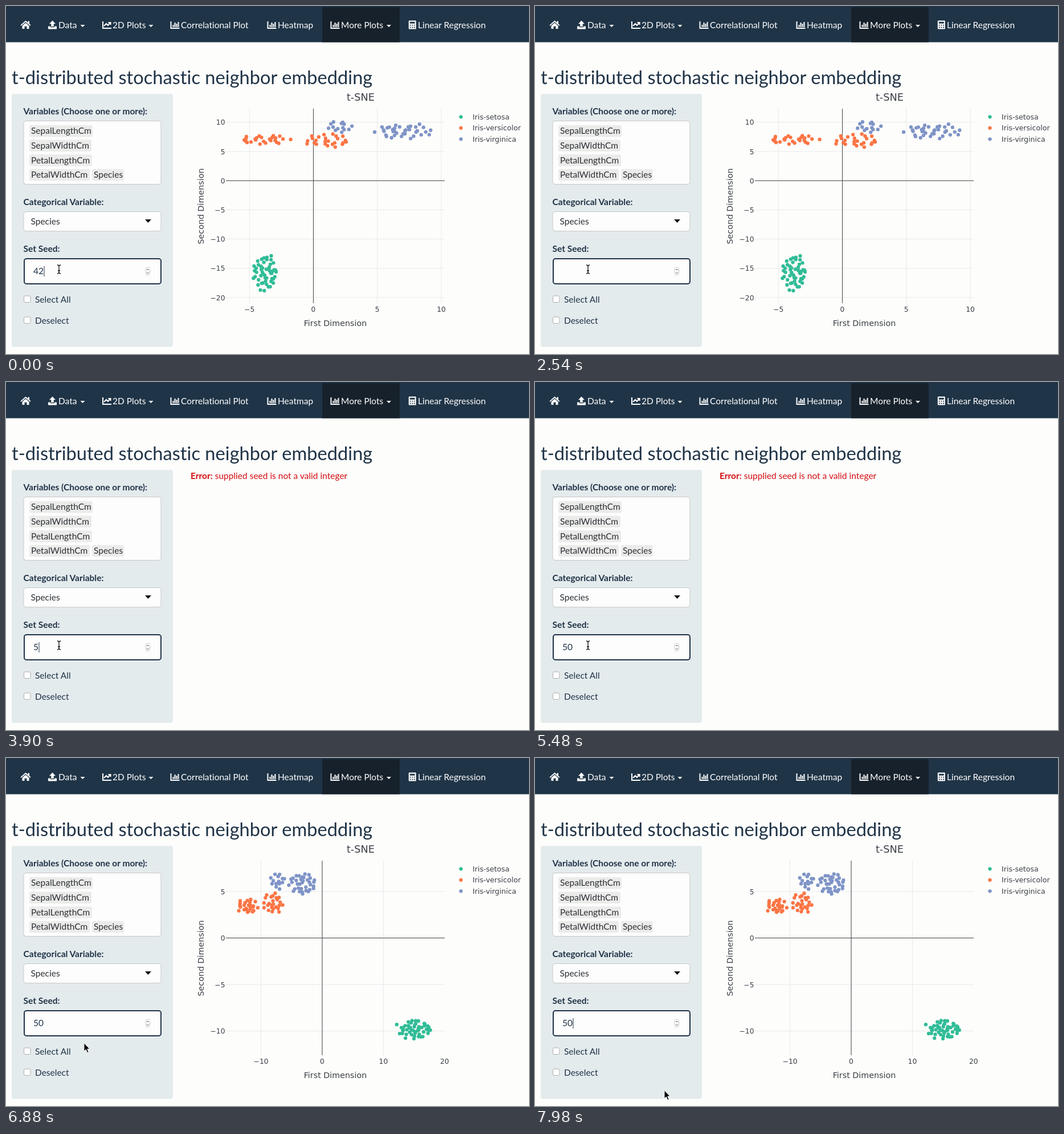
Recreate the animation shown at these times as an HTML page. Size 918 by 610 pixels, loop 8000 ms.

```html
<!DOCTYPE html>
<html lang="en">
<head>
<meta charset="utf-8">
<title>t-SNE explorer</title>
<style>
  html, body { margin: 0; width: 100%; height: 100%; overflow: hidden; background: #fdfdfb; }
  svg { display: block; width: 918px; height: 610px; }
  text { font: 15.5px Lato, sans-serif; font-variant-ligatures: none; fill: #1f3347; white-space: pre; }
  .heading { font-size: 32.65px; }
  .bold { font-weight: 700; }
  .nav text { fill: #fff; }
  .icon { fill: #fff; }
  .line { fill: none; stroke: #fff; stroke-width: 2; }
  .field { fill: #fdfdfd; stroke: #c5c9c6; }
  .focus { fill: #fdfdfd; stroke: #1f3347; stroke-width: 2; }
  .check { fill: #fff; stroke: #aaadb0; }
  .chip { fill: #ebebea; }
  .dark { fill: #2b2f33; }
  .error text { fill: #d40d12; }
  .plot text { font: 12.3px "DejaVu Sans", sans-serif; fill: #3a3f46; }
  .plot .axis { font-size: 14.3px; text-anchor: middle; }
  .plot .title { font-size: 17.8px; text-anchor: middle; }
  .plot .legend { font-size: 12.6px; }
  .grid { stroke: #e9e9ee; }
  .zero { stroke: #444; }
</style>
</head>
<body>
<svg viewBox="0 0 918 610">
  <defs>
    <g id="bars">
      <path class="line" d="M1 27V39H16"/>
      <path class="icon" d="M4 33h2v4h-2zM7 29h2v8h-2zM10 31h2v6h-2zM13 28h2v9h-2z"/>
    </g>
    <path id="down" class="icon" d="M0 0H8L4 4Z"/>
    <path id="ibeam" d="M-3-7Q0-7 0-4V5Q0 8 -3 8M3-7Q0-7 0-4V5Q0 8 3 8M-2 3H2"/>
  </defs>
  <rect width="918" height="610" fill="#fdfdfb"/>

  <g class="nav">
    <rect width="918" height="63.5" fill="#1f3447"/>
    <rect x="555" y="2" width="136" height="61.5" fill="#17212b"/>
    <path class="icon" d="M25.5 33.5L34.5 25.5L38.5 29V26.5H41V31.2L43.5 33.5L42.3 34.7L34.5 28L26.7 34.7Z"/>
    <path class="icon" d="M28.5 34.7L34.5 29.6L40.5 34.7V40H36.5V35.8H32.5V40H28.5Z"/>
    <path class="icon" d="M81.5 25.5L87 31.2H83.8V36H79.2V31.2H76ZM74 35.5H78V37.2H85V35.5H89V40.5H74Z"/>
    <path class="line" d="M170 27V39H185M172 35L176 31L179 34L183 29M179.5 29H183.5V33"/>
    <use href="#bars" x="288.5"/><use href="#bars" x="458.5"/><use href="#bars" x="569.5"/>
    <rect class="icon" x="706.8" y="25.5" width="13" height="15" rx="1.2"/>
    <path d="M708.8 29.2H717.8" stroke="#1f3447" stroke-width="3"/>
    <path d="M708.8 33.6H718M708.8 37.5H718" stroke="#1f3447" stroke-width="1.9" stroke-dasharray="1.8"/>
    <use href="#down" x="130.5" y="33"/><use href="#down" x="250.5" y="33"/><use href="#down" x="668" y="33"/>
    <text x="92" y="39">Data</text>
    <text x="187" y="39">2D Plots</text>
    <text x="307" y="39">Correlational Plot</text>
    <text x="477" y="39">Heatmap</text>
    <text x="588" y="39">More Plots</text>
    <text x="723" y="39">Linear Regression</text>
  </g>

  <text class="heading" x="10" y="137">t-distributed stochastic neighbor embedding</text>

  <rect x="10" y="154" width="283" height="443.5" rx="4" fill="#e4ebed"/>
  <text class="bold" x="30.5" y="190">Variables (Choose one or more):</text>
  <rect class="field" x="31" y="201.5" width="241" height="111" rx="4"/>
  <g id="chips"></g>
  <text class="bold" x="30.5" y="349">Categorical Variable:</text>
  <rect class="field" x="31" y="360.5" width="241" height="34" rx="4"/>
  <text class="dark" x="43.5" y="383">Species</text>
  <path d="M244 374H255L249.5 380Z" fill="#111"/>
  <text class="bold" x="30.5" y="431">Set Seed:</text>
  <rect class="focus" x="32" y="443" width="240" height="44" rx="4"/>
  <text id="seed" x="48" y="470"></text>
  <rect id="caret" y="456" width="1" height="18" fill="#1f3347"/>
  <rect x="245" y="458" width="7.5" height="14" rx="3.5" fill="#fff" stroke="#bbb" stroke-width=".8"/>
  <path d="M247 463L248.8 461L250.6 463M247 467L248.8 469L250.6 467" fill="none" stroke="#444"/>
  <rect class="check" x="31.5" y="508" width="11.5" height="11.5" rx="2.5"/>
  <rect class="check" x="31.5" y="545" width="11.5" height="11.5" rx="2.5"/>
  <text x="51" y="519.5">Select All</text>
  <text x="51" y="556.5">Deselect</text>

  <g class="error" id="error">
    <text x="324" y="170"><tspan class="bold">Error:</tspan> supplied seed is not a valid integer</text>
  </g>
  <g class="plot" id="first"></g>
  <g class="plot" id="second"></g>

  <g id="beam" fill="none">
    <use href="#ibeam" stroke="#fff" stroke-width="2.6"/>
    <use href="#ibeam" stroke="#111" stroke-width="1.3"/>
  </g>
  <path id="arrow" d="M0 0V14.5L3.3 11.4L5.8 17L8.2 16L5.8 10.5H10.2Z" fill="#000" stroke="#fff"/>
</svg>

<script>
const $ = id => document.getElementById(id);

function add(parent, tag, attrs, content = '') {
  const el = document.createElementNS('http://www.w3.org/2000/svg', tag);
  for (const key in attrs) el.setAttribute(key, attrs[key]);
  el.textContent = content;
  return parent.appendChild(el);
}

function chip(x, row, width, label) {
  const y = 209 + row * 25.6;
  add($('chips'), 'rect', { class: 'chip', x, y, width, height: 20.5, rx: 3 });
  add($('chips'), 'text', { class: 'dark', x: x + 3, y: y + 15.3 }, label);
}
chip(41, 0, 111, 'SepalLengthCm');
chip(41, 1, 109, 'SepalWidthCm');
chip(41, 2, 110, 'PetalLengthCm');
chip(41, 3, 106, 'PetalWidthCm');
chip(151, 3, 56, 'Species');

let state = 7;
const random = () => (state = state * 16807 % 2147483647) / 2147483647 - 0.5;

const dot = (g, cx, cy, fill) => add(g, 'circle', { cx, cy, r: 3.15, fill });

// Spreads points over an ellipse along a jittered golden-angle spiral.
function blob(g, fill, cx, cy, rx, ry, count) {
  for (let i = 0; i < count; i++) {
    const r = Math.sqrt((i + 0.5) / count), a = i * 2.4;
    dot(g, cx + rx * (r * Math.cos(a) + random() * 0.3),
           cy + ry * (r * Math.sin(a) + random() * 0.3), fill);
  }
}

function axes(g, x, y) {
  const values = ({ from, to, step }) =>
    Array.from({ length: (to - from) / step + 1 }, (_, i) => from + i * step);
  const label = v => String(v).replace('-', '−');
  const vertical = (px, type) =>
    add(g, 'line', { class: type, x1: px, x2: px, y1: 180, y2: 521 });
  const horizontal = (py, type) =>
    add(g, 'line', { class: type, x1: 386, x2: 770, y1: py, y2: py });

  for (const v of values(x)) {
    const px = x.zero + v * x.unit;
    if (px < 768) vertical(px, 'grid');
    add(g, 'text', { x: px, y: 536, 'text-anchor': 'middle' }, label(v));
  }
  for (const v of values(y)) {
    const py = y.zero - v * y.unit;
    horizontal(py, 'grid');
    add(g, 'text', { x: 384.5, y: py + 4.5, 'text-anchor': 'end' }, label(v));
  }
  vertical(x.zero, 'zero');
  horizontal(y.zero, 'zero');
  add(g, 'text', { class: 'title', x: 622.5, y: 166 }, 't-SNE');
  add(g, 'text', { class: 'axis', x: 578, y: 560.5 }, 'First Dimension');
  add(g, 'text', { class: 'axis', transform: 'translate(347 351) rotate(-90)' }, 'Second Dimension');
}

const SETOSA = '#31bc97', VERSICOLOR = '#fb7545', VIRGINICA = '#7f94c7';

function legend(g) {
  const entries = { 'Iris-setosa': SETOSA, 'Iris-versicolor': VERSICOLOR, 'Iris-virginica': VIRGINICA };
  Object.entries(entries).forEach(([name, color], i) => {
    const y = 194.3 + i * 19.5;
    dot(g, 798.5, y, color);
    add(g, 'text', { class: 'legend', x: 819, y: y + 4.5 }, name);
  });
}

const first = $('first');
axes(first, { from: -5, to: 10, step: 5, zero: 539.5, unit: 22.45 },
            { from: -20, to: 10, step: 5, zero: 306.2, unit: 10.24 });
blob(first, SETOSA, 455, 468, 22, 31, 50);
blob(first, VERSICOLOR, 453, 234, 45, 8, 25);
blob(first, VERSICOLOR, 563, 236, 41, 12, 25);
blob(first, VIRGINICA, 585, 212, 22, 11, 14);
blob(first, VIRGINICA, 696, 219, 50, 13, 36);
legend(first);

const second = $('second');
axes(second, { from: -10, to: 20, step: 10, zero: 555, unit: 10.74 },
             { from: -10, to: 5, step: 5, zero: 315.5, unit: 16.3 });
blob(second, SETOSA, 717, 476, 31, 16, 50);
blob(second, VERSICOLOR, 424, 260, 18, 12, 25);
blob(second, VERSICOLOR, 468, 254, 18, 18, 25);
blob(second, VIRGINICA, 477, 216, 13, 16, 14);
blob(second, VIRGINICA, 520, 220, 24, 19, 36);
legend(second);

const DURATION = 8000, BLINK = 680;
const ERROR_AT = 2720, REDRAW_AT = 5960, ARROW_AT = 6820;
const edits = [
  { at: 0, value: '42' }, { at: 1960, value: '4' }, { at: 2120, value: '' },
  { at: 3760, value: '5' }, { at: 4324, value: '50' }
];

function ease(t, from, to) {
  const u = Math.min(1, Math.max(0, (t - from) / (to - from)));
  return u * u * (3 - 2 * u);
}

// The pointer leaves the field, then drifts slightly.
function pointer(t) {
  const leave = ease(t, 6680, 7200), drift = ease(t, 7540, 7900);
  return [93 + 132 * leave + 2 * drift, 461 + 116 * leave + 5.5 * drift];
}

const show = (id, on) => $(id).setAttribute('visibility', on ? 'visible' : 'hidden');

function render(t) {
  const { at, value } = edits.findLast(edit => edit.at <= t);
  $('seed').textContent = value;
  $('caret').setAttribute('x', 48.5 + value.length * 9);
  show('caret', (t - at) % BLINK < BLINK / 2);
  show('first', t < ERROR_AT);
  show('error', t >= ERROR_AT && t < REDRAW_AT);
  show('second', t >= REDRAW_AT);
  show('beam', t < ARROW_AT);
  show('arrow', t >= ARROW_AT);
  const place = `translate(${pointer(t).join(' ')})`;
  $('beam').setAttribute('transform', place);
  $('arrow').setAttribute('transform', place);
}

const start = performance.now();
function frame() {
  render((performance.now() - start) % DURATION);
  requestAnimationFrame(frame);
}
frame();
</script>
</body>
</html>
```
